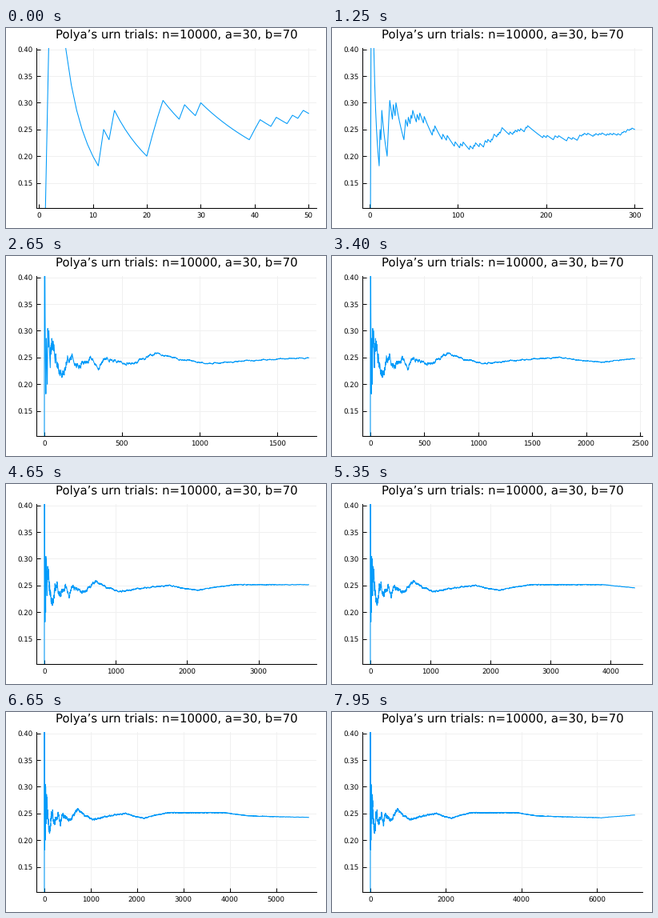
Animation of 400 by 250 pixels, one loop 8 s. Source, as a matplotlib script:

```python
import math

import matplotlib.pyplot as plt
import numpy as np
from matplotlib.animation import FuncAnimation

WIDTH, HEIGHT, DPI = 400, 250, 100
FRAMES, INTERVAL = 160, 50
HOLD, STEP, TOTAL = 20, 50, 7000
PX = 72 / DPI  # points per pixel

plt.rcParams.update({"font.family": "DejaVu Sans", "text.hinting": "none"})

OPENING_HITS = [2, 3, 12, 14, 21, 22, 23, 27, 30, 40, 41, 44, 47, 49]
# Turning points of the walk: (draw, share of hits).
TURNS = [(50, 0.28), (62, 0.274), (83, 0.23), (116, 0.2155), (178, 0.256),
         (233, 0.231), (300, 0.25), (342, 0.231), (400, 0.247), (580, 0.239),
         (720, 0.257), (1060, 0.238), (1754, 0.25), (2140, 0.241),
         (2670, 0.2515), (3880, 0.2515), (4400, 0.2455), (6130, 0.242),
         (7000, 0.247)]


def urn_shares(pull=0.1, seed=7):
    """Share of hits in a random walk that is pulled towards the turns."""
    rng = np.random.default_rng(seed)
    draws = np.arange(TOTAL + 1)
    turn, share = np.array(TURNS).T
    trend = np.interp(draws, turn, turn * share)
    counts = np.zeros(TOTAL + 1)
    counts[OPENING_HITS] = 1
    counts = np.cumsum(counts)
    for n in range(int(turn[0]) + 1, TOTAL + 1):
        chance = trend[n] - trend[n - 1] + pull * (trend[n - 1] - counts[n - 1])
        counts[n] = counts[n - 1] + (rng.random() < chance)
    return counts[1:] / draws[1:]


def nice_ticks(low, high):
    """Ticks from zero, scored by count, coverage and roundness of the step."""
    niceness = {1: 1.0, 5: 0.9, 2: 0.7, 2.5: 0.5, 3: 0.2}
    best_score, best = -math.inf, None
    top = math.ceil(math.log10(high - low))
    for power in range(top, top - 3, -1):
        for base, nice in niceness.items():
            step = base * 10.0 ** power
            count = int(high / step + 1e-9) + 1
            if not 4 <= count <= 8:
                continue
            balance = 1 - abs(count - 5) / 5
            coverage = 1.5 * (high - low) / ((count - 1) * step)
            score = balance / 4 + coverage / 3 + nice / 4
            tied = abs(score - best_score) < 1e-9
            if (tied and count < len(best)) or (not tied and score > best_score):
                best_score, best = score, step * np.arange(count)
    return best


shares = urn_shares()
draws = np.arange(1, TOTAL + 1)

fig = plt.figure(figsize=(WIDTH / DPI, HEIGHT / DPI), dpi=DPI, facecolor="white")
ax = fig.add_axes([38.0 / WIDTH, 24.7 / HEIGHT, 350.2 / WIDTH, 200.3 / HEIGHT])
ax.set_ylim(0.1025, 0.4025)
ax.set_yticks(np.arange(0.15, 0.41, 0.05))
ax.yaxis.set_major_formatter("{x:.2f}")
ax.xaxis.set_major_formatter("{x:.0f}")
ax.spines[["top", "right"]].set_visible(False)
ax.spines[["left", "bottom"]].set_linewidth(1 * PX)
ax.tick_params(direction="in", length=5 * PX, width=1 * PX, labelsize=8.7 * PX)
ax.tick_params(axis="x", pad=12 * PX)
ax.tick_params(axis="y", pad=4.4 * PX)
ax.grid(color="0.94", linewidth=1 * PX)
ax.set_axisbelow(True)
fig.text(213.0 / WIDTH, 1 - 13.1 / HEIGHT, "Polya’s urn trials: n=10000, a=30, b=70",
         ha="center", va="baseline", fontsize=14.85 * PX)
line, = ax.plot([], [], color="#009AF9", linewidth=1.05 * PX)


def update(frame):
    n = STEP * max(1, frame - HOLD + 1)
    margin = 0.03 * (n - 1)
    low, high = 1 - margin, n + margin
    line.set_data(draws[:n], shares[:n])
    ax.set_xticks(nice_ticks(low, high))
    ax.set_xlim(low, high)
    for label in ax.get_xticklabels():
        label.set_va("baseline")
    return line,


anim = FuncAnimation(fig, update, frames=FRAMES, interval=INTERVAL,
                     repeat=True, repeat_delay=0, blit=False)
plt.show()
```
